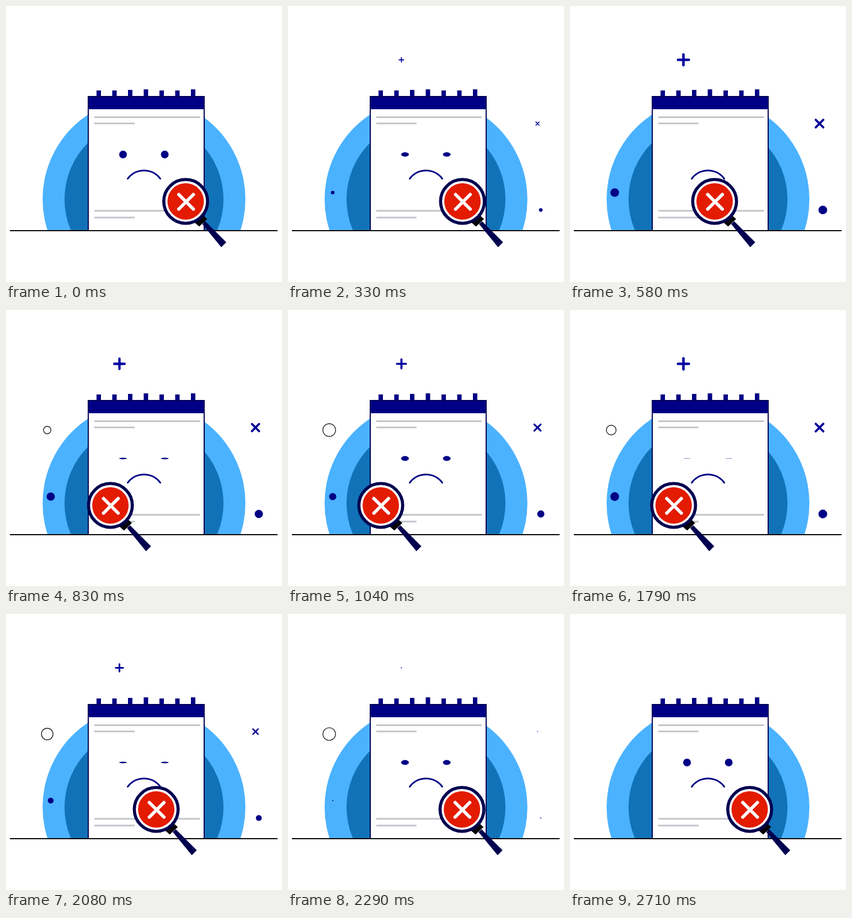
An HTML page for the animation above (2960 ms loop, 500 by 500 pixels).

```html
<!DOCTYPE html>
<html lang="en">
<head>
<meta charset="utf-8">
<title>Nothing found</title>
<style>
  html, body { margin: 0; width: 100%; height: 100%; overflow: hidden; background: #fff; }
  svg { display: block; width: 100%; height: 100%; }
</style>
</head>
<body>
<svg viewBox="0 0 500 500">
  <clipPath id="above"><path d="M0 0H500V407H0Z"/></clipPath>
  <g clip-path="url(#above)">
    <circle cx="250" cy="350" r="183.7" fill="#4bb2ff"/>
    <circle cx="250" cy="350" r="144" fill="#1272b8"/>
  </g>

  <g id="marks" fill="#000085" stroke-linecap="round">
    <path data-at="205.5 97.5" d="M-10 0H10M0 -10V10" stroke="#0000a0" stroke-width="4.6"/>
    <path data-at="452 213" d="M-7 -7L7 7M7 -7L-7 7" stroke="#000098" stroke-width="4"/>
    <circle data-at="458 369.5" r="8"/>
    <circle data-at="81 338" r="8"/>
  </g>
  <circle id="ring" cx="74.7" cy="217.5" fill="none" stroke="#222" stroke-width="1.4"/>

  <g id="pegs" fill="#000085"></g>
  <path d="M149 164H359V407H149Z" fill="#fff" stroke="#000055" stroke-width="2"/>
  <path d="M149 164H359V187H149Z" fill="#000085"/>
  <path d="M149 187V164H359V187" fill="none" stroke="#000055" stroke-width="2"/>
  <path d="M160 201.5H351.5M160 212.7H233M160 371H351.5M160 383.3H233" stroke="#c1c5cb" stroke-width="3"/>
  <g fill="#000085">
    <ellipse class="eye" cx="212" cy="269" rx="7"/>
    <ellipse class="eye" cx="287.6" cy="269" rx="7"/>
  </g>
  <path d="M220.5 312.8A36.7 36.7 0 0 1 279.5 312.8" fill="none" stroke="#000085" stroke-width="3" stroke-linecap="round"/>
  <path d="M7 407H492" stroke="#000" stroke-width="2"/>

  <g id="lens">
    <path d="M30 41L35.5 36L73.5 74L64.5 83Z" fill="#00004f"/>
    <path d="M16.5 38.5L31.5 25L39 32L24.5 45.5Z" fill="#050508"/>
    <circle r="39.7" fill="#fff" stroke="#00004f" stroke-width="5.6"/>
    <circle r="33" fill="#e31b00"/>
    <path d="M-12.5 -12.5L14 14M14 -12.5L-12.5 14" stroke="#fff" stroke-width="6" stroke-linecap="round"/>
  </g>
</svg>
<script>
const LOOP = 2960, REST = 2710;
const $ = id => document.getElementById(id);
const eyes = document.querySelectorAll('.eye');
const marks = [...$('marks').children];

const smooth = p => p * p * (3 - 2 * p);
const strong = p => p < .5 ? .5 * (2 * p) ** 2.4 : 1 - .5 * (2 - 2 * p) ** 2.4;

// keys: [time, value] pairs in order of time
function track(keys, ease, t) {
  if (t <= keys[0][0]) return keys[0][1];
  for (let i = 1; i < keys.length; i++) {
    const [a, from] = keys[i - 1], [b, to] = keys[i];
    if (t < b) return from + (to - from) * ease((t - a) / (b - a));
  }
  return keys[keys.length - 1][1];
}

const lensX = [[125, 325.5], [1125, 167], [1505, 167], [2505, 325.5]];
const markSize = [[100, 0], [625, 1], [1250, .75], [1875, 1], [2407, 0]];
const ringSize = [[535, 0], [1070, 1], [1540, .7], [2420, 1], [2700, 0]];
const eyeOpen = [[100, 1], [600, 0], [1350, 1], [1850, 0], [2600, 1]];

[153, 153, 152, 151, 153, 153, 151].forEach((top, i) => {
  const peg = document.createElementNS('http://www.w3.org/2000/svg', 'path');
  peg.setAttribute('d', `M${164 + i * 28.5} ${top}h8V165h-8Z`);
  $('pegs').append(peg);
});

function draw(t) {
  if (t < 130 || t >= REST) t = 0;
  $('lens').setAttribute('transform', `translate(${track(lensX, strong, t)} 354)`);

  const size = track(markSize, smooth, t);
  for (const m of marks) {
    m.setAttribute('transform', `translate(${m.dataset.at}) scale(${size})`);
    m.setAttribute('visibility', size > .01 ? 'visible' : 'hidden');
  }

  const r = 11.6 * track(ringSize, smooth, t);
  $('ring').setAttribute('r', r);
  $('ring').setAttribute('visibility', r > .6 ? 'visible' : 'hidden');

  const open = track(eyeOpen, smooth, t);
  eyes.forEach(e => e.setAttribute('ry', 7 * open));
}

const start = performance.now();
function tick() {
  draw((performance.now() - start) % LOOP);
  requestAnimationFrame(tick);
}
tick();
</script>
</body>
</html>
```
